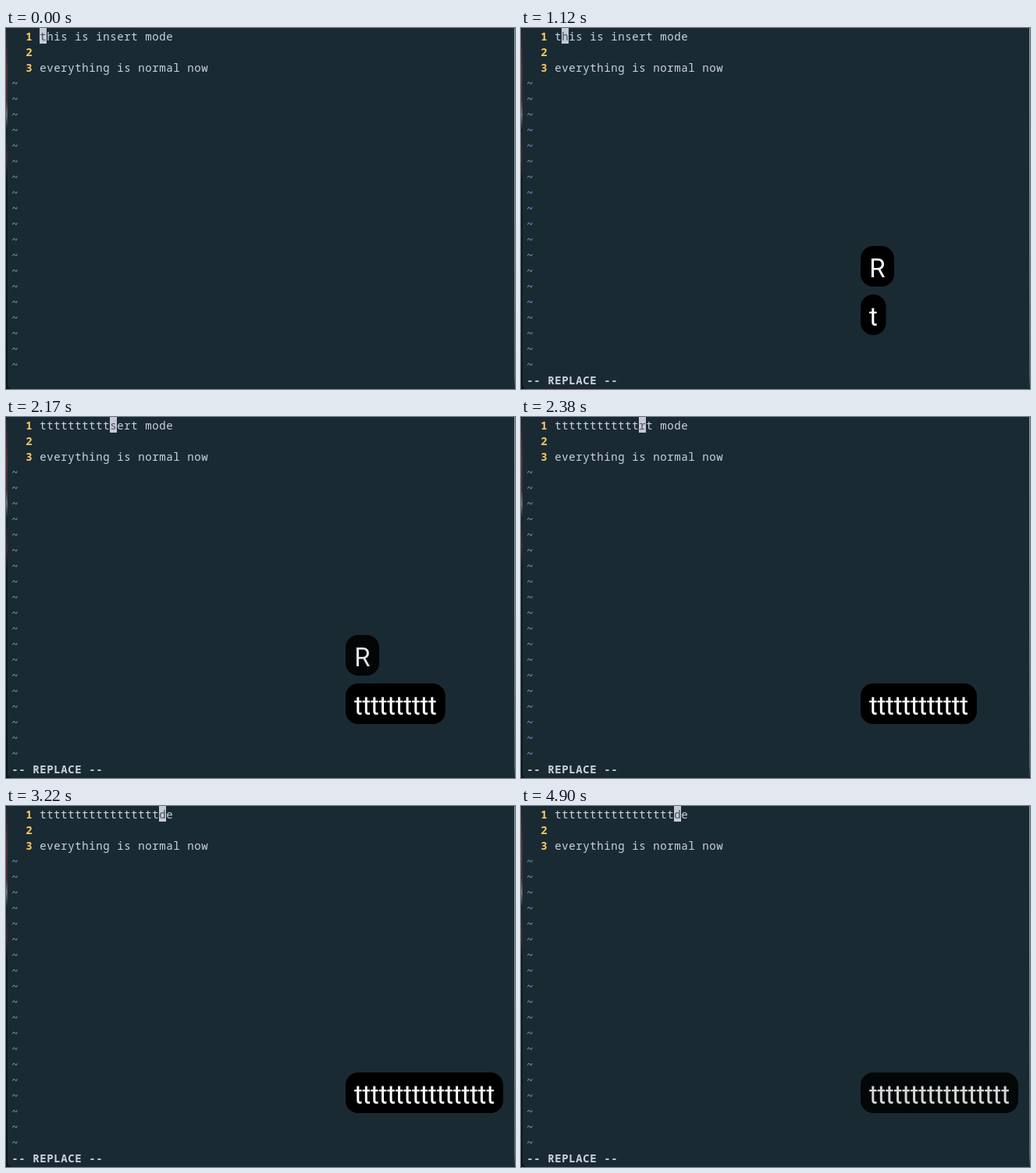
Recreate the animation shown at these times as an HTML page with a canvas. Size 652 by 462 pixels, loop 4.97 s.

```html
<!DOCTYPE html>
<html lang="en">
<head>
<meta charset="utf-8">
<title>Replace mode</title>
<style>
  html, body { margin: 0; width: 100%; height: 100%; overflow: hidden; background: #1a2a33; }
  canvas { display: block; }
</style>
</head>
<body>
<canvas id="stage" width="652" height="462"></canvas>
<script>
const W = 652, H = 462, LOOP = 4970, STEP = 70;
const CELL = 9, LINE = 20, LEFT = 7;
const MONO = '14px "Noto Sans Mono", "DejaVu Sans Mono", monospace';
const LABEL = '400 33px Roboto, Inter, sans-serif';
const COLOR = { bg: '#1a2a33', text: '#cdd3de', number: '#fac863', tilde: '#6fa3d6', cursor: '#c6cad6', under: '#46525d' };
const FIRST = 'this is insert mode';

// Key times in ms: R, the first t, then auto-repeat
const KEY_R = 70, KEY_T = 910, REPEAT_FROM = 1368, REPEAT = 94, MAX = 17;
const LAG = 40, HOLD = 2000, FADE = 300;
const LAST_T = REPEAT_FROM + REPEAT * (MAX - 2);

const ctx = document.getElementById('stage').getContext('2d');

function typed(t) {
  if (t < KEY_T) return 0;
  if (t < REPEAT_FROM) return 1;
  return Math.min(MAX, 2 + Math.floor((t - REPEAT_FROM) / REPEAT));
}

function opacity(t, pressed) {
  const p = Math.min(1, Math.max(0, (t - pressed - HOLD) / FADE));
  return 1 - p * p;
}

// Each character is centred in its own cell
function glyphs(str, x, y, advance) {
  ctx.textAlign = 'center';
  [...str].forEach((c, i) => ctx.fillText(c, x + (i + 0.5) * advance, y));
}

function mono(str, col, row, color, weight = 500) {
  ctx.font = `${weight} ${MONO}`;
  ctx.fillStyle = color;
  glyphs(str, LEFT + col * CELL, 16 + row * LINE, CELL);
}

function gradient(stops) {
  const g = ctx.createLinearGradient(0, 0, 0, H);
  stops.forEach(([at, color]) => g.addColorStop(at, color));
  return g;
}

function roundBox(x, y, w, h, radii, color) {
  ctx.fillStyle = color;
  ctx.beginPath();
  ctx.roundRect(x, y, w, h, radii);
  ctx.fill();
}

const desktopLeft = gradient([[0, '#1c222c'], [0.12, '#5a3036'], [0.2, '#4a2c34'], [0.24, '#6c6f74'],
  [0.28, '#14202b'], [0.36, '#3a2a33'], [0.42, '#0d1822'], [1, '#0a141e']]);
const desktopRight = gradient([[0, '#8fa3a8'], [0.6, '#7d949b'], [0.97, '#4f6a75'], [1, '#16242e']]);

function drawWindow() {
  ctx.fillStyle = desktopLeft;
  ctx.fillRect(0, 0, W / 2, H);
  ctx.fillStyle = desktopRight;
  ctx.fillRect(W / 2, 0, W / 2, H);
  roundBox(2, 0, W - 3, H, [0, 0, 6, 6], COLOR.bg);
}

function drawEditor(t) {
  const n = typed(t - LAG);
  const line = 't'.repeat(n) + FIRST.slice(n);
  ['1', '2', '3'].forEach((d, row) => mono(d, 2, row, COLOR.number, 600));
  mono(line, 4, 0, COLOR.text);
  mono('everything is normal now', 4, 2, COLOR.text);
  for (let row = 3; row < 22; row++) mono('~', 0, row, COLOR.tilde);

  ctx.fillStyle = COLOR.cursor;
  ctx.fillRect(LEFT + (4 + n) * CELL, 0, CELL, LINE);
  mono(line[n], 4 + n, 0, COLOR.under);

  if (t >= KEY_R + LAG) mono('-- REPLACE --', 0, 22, COLOR.text, 800);
}

function badge(str, y, advance, alpha) {
  if (alpha <= 0) return;
  ctx.globalAlpha = alpha;
  roundBox(435, y, 22 + advance * str.length, 52, 16, '#000');
  ctx.font = LABEL;
  ctx.fillStyle = '#fff';
  glyphs(str, 446, y + 39.5, advance);
  ctx.globalAlpha = 1;
}

function drawKeys(t) {
  const n = typed(t);
  if (t >= KEY_R) badge('R', n ? 279 : 341, 21, opacity(t, KEY_R));
  if (n) badge('t'.repeat(n), 341, 10.58, opacity(t, LAST_T));
}

function draw(now) {
  const t = Math.floor((now % LOOP) / STEP) * STEP;
  drawWindow();
  drawEditor(t);
  drawKeys(t);
}

const start = performance.now();
function tick() {
  draw(performance.now() - start);
  requestAnimationFrame(tick);
}
tick();
</script>
</body>
</html>
```
